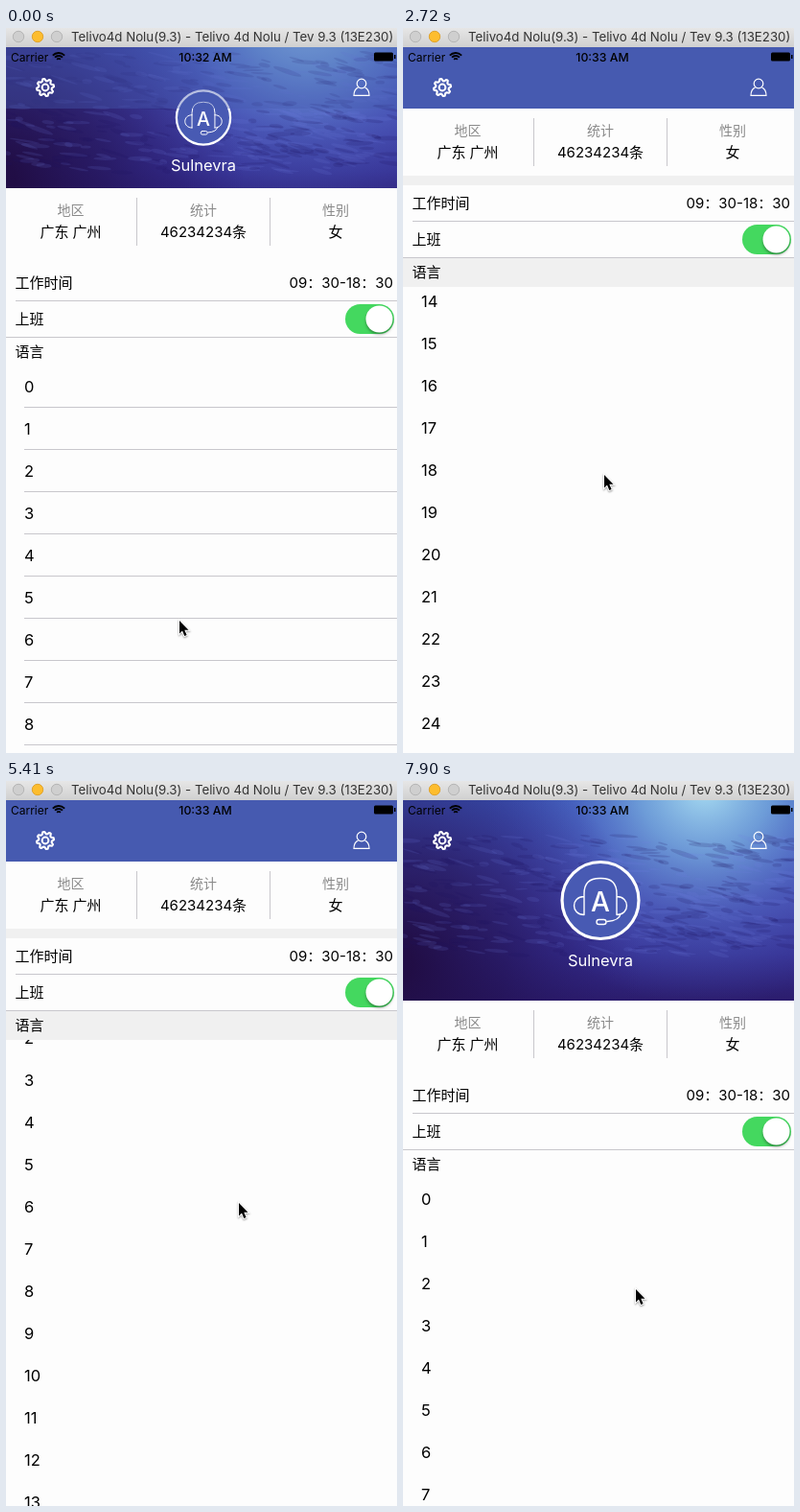
An HTML page with a canvas for the animation above (8 s loop, 408 by 756 pixels).

```html
<!DOCTYPE html>
<html lang="zh-CN">
<head>
<meta charset="utf-8">
<style>
  html, body { margin: 0; width: 100%; height: 100%; overflow: hidden; background: #fdfdfd; }
  canvas { display: block; width: 408px; height: 756px; }
</style>
</head>
<body>
<canvas id="stage" width="408" height="756"></canvas>
<script>
const W = 408, H = 756, LOOP = 8000, STEP = 117.7, NAV = 84;
const BLUE = '#465ab0', LINE = '#c8c7cc', INK = '#000', GRAY = '#8a8a8a';
const ctx = document.getElementById('stage').getContext('2d');

// [step, first row y, pointer x, pointer y]
const KEYS = [
  [0, 374, 181, 618], [4, 330, 186, 580], [7, 258, 189, 545], [11, 90, 193, 528],
  [17, -111, 197, 506], [24, -360, 212, 460], [31, -503, 225, 422], [34, -420, 230, 452],
  [39, -94, 238, 520], [45, 180, 243, 440], [50, 287, 246, 378], [53, 312, 246, 402],
  [56, 374, 245, 464], [59, 374, 245, 464], [62, 384, 244, 473], [67, 436, 243, 530]
];

function slope(i, c) {
  if (i === 0 || i === KEYS.length - 1) return 0;
  const [p, k, n] = [KEYS[i - 1], KEYS[i], KEYS[i + 1]];
  const a = (k[c] - p[c]) / (k[0] - p[0]), b = (n[c] - k[c]) / (n[0] - k[0]);
  return a * b > 0 ? 2 * a * b / (a + b) : 0;
}

function valueAt(step, c) {
  let i = 0;
  while (i < KEYS.length - 2 && step >= KEYS[i + 1][0]) i++;
  const a = KEYS[i], b = KEYS[i + 1], d = b[0] - a[0];
  const u = Math.min(1, (step - a[0]) / d), v = 1 - u;
  return Math.round(a[c] * (1 + 2 * u) * v * v + b[c] * u * u * (3 - 2 * u)
    + d * (slope(i, c) * u * v * v - slope(i + 1, c) * u * u * v));
}

function text(str, x, y, size, color = INK, align = 'left', weight = 400) {
  ctx.font = `${weight} ${size}px Inter, "Noto Sans CJK SC", "Noto Sans CJK", sans-serif`;
  ctx.textAlign = align;
  ctx.fillStyle = color;
  ctx.fillText(str, x, Math.round(y + size * 0.365));
}

function rect(x, y, w, h, color) {
  ctx.fillStyle = color;
  ctx.fillRect(x, y, w, h);
}

function disc(x, y, r, fill, stroke, width = 1) {
  ctx.beginPath();
  ctx.arc(x, y, r, 0, Math.PI * 2);
  if (fill) { ctx.fillStyle = fill; ctx.fill(); }
  if (stroke) { ctx.strokeStyle = stroke; ctx.lineWidth = width; ctx.stroke(); }
}

function pill(x, y, w, h, r, color) {
  ctx.beginPath();
  ctx.roundRect(x, y, w, h, r);
  ctx.fillStyle = color;
  ctx.fill();
}

function strokePath(d, width, color = '#fff') {
  ctx.strokeStyle = color;
  ctx.lineWidth = width;
  ctx.stroke(new Path2D(d));
}

// Underwater backdrop, centred vertically in the header.
const sea = document.createElement('canvas');
sea.width = W;
sea.height = 260;
(function paintSea() {
  const g = sea.getContext('2d');
  const fill = (gradient, stops) => {
    stops.forEach(([at, color]) => gradient.addColorStop(at, color));
    g.fillStyle = gradient;
    g.fillRect(0, 0, W, 260);
  };
  fill(g.createLinearGradient(0, 20, 0, 240), [
    [0, '#3a55b4'], [0.25, '#404cb0'], [0.5, '#403fa4'], [0.75, '#352f90'], [1, '#2a1a68']
  ]);
  fill(g.createRadialGradient(315, 10, 0, 315, 10, 230), [
    [0, 'rgba(170,222,242,1)'], [0.3, 'rgba(125,180,228,.75)'],
    [0.6, 'rgba(90,125,212,.4)'], [1, 'rgba(75,90,200,0)']
  ]);
  fill(g.createRadialGradient(-10, 195, 20, -10, 195, 260), [
    [0, 'rgba(32,12,66,.95)'], [0.4, 'rgba(34,16,80,.65)'], [1, 'rgba(40,24,110,0)']
  ]);
  let seed = 7;
  const rnd = () => (seed = seed * 16807 % 2147483647) / 2147483647;
  for (let i = 0; i < 420; i++) {
    const x = rnd() * W, depth = rnd(), y = 62 + depth * 125;
    g.fillStyle = rnd() > 0.5 ? 'rgba(115,130,230,.14)' : 'rgba(32,18,95,.17)';
    g.beginPath();
    g.ellipse(x, y, 4 + rnd() * 12, 0.8 + rnd() * 1.8, 0.35 - rnd() * 0.4, 0, Math.PI * 2);
    g.fill();
  }
})();

function drawAvatar(cy, d) {
  ctx.save();
  ctx.translate(206, cy);
  ctx.scale(d / 83, d / 83);
  disc(0, 0, 40, '#485ab3', '#fff', 3.2);
  ctx.lineCap = 'round';
  strokePath('M-17 15V-7Q-17-23-1-23H1Q17-23 17-7V15'
    + 'M-17-4C-31-4-31 15-17 15M17-4C31-4 31 15 17 15'
    + 'M21 14Q20 21 7 22', 1.4);
  ctx.beginPath();
  ctx.roundRect(-4, 20, 10, 5, 2.5);
  ctx.stroke();
  text('A', 0, 2, 28, '#fff', 'center', 500);
  ctx.restore();
}

function drawGear() {
  ctx.save();
  ctx.translate(41, 62);
  ctx.beginPath();
  for (let i = 0; i < 32; i++) {
    const a = (i - 1.5) / 32 * Math.PI * 2, r = i % 4 < 2 ? 6.9 : 9.1;
    ctx.lineTo(r * Math.sin(a), r * Math.cos(a));
  }
  ctx.closePath();
  ctx.lineJoin = 'round';
  ctx.lineWidth = 2.1;
  ctx.strokeStyle = '#fff';
  ctx.stroke();
  disc(0, 0, 3.4, null, '#fff', 2);
  ctx.restore();
}

function drawHeader(bottom) {
  const h = bottom - 20, cy = 20 + h / 2, d = h * 0.397;
  ctx.save();
  ctx.beginPath();
  ctx.rect(0, 20, W, h);
  ctx.clip();
  ctx.drawImage(sea, 0, Math.round(cy - 130));
  drawAvatar(cy, d);
  text('Sulnevra', 206, cy + d / 2 + 20.5, 16.5, '#fff', 'center');
  ctx.globalAlpha = Math.max(0, Math.min(1, (220 - bottom) / (220 - NAV)));
  rect(0, 20, W, NAV - 20, BLUE);
  ctx.restore();
  drawGear();
  disc(371, 58, 4.8, null, '#fff', 1.2);
  strokePath('M367.5 62Q363 64 363 70.4H379Q379 64 374.5 62', 1.2);
}

function drawStatus(clock) {
  text('Carrier', 5, 30.5, 12);
  for (const r of [2.5, 5.5, 8.5]) {
    ctx.beginPath();
    ctx.arc(55, 34.5, r, -Math.PI * 0.76, -Math.PI * 0.24);
    ctx.strokeStyle = INK;
    ctx.lineWidth = 1.8;
    ctx.stroke();
  }
  text(clock, 208, 30.5, 12.3, INK, 'center', 500);
  pill(384, 25.5, 20, 9, 1.5, INK);
  rect(405, 28, 1.5, 4, INK);
}

function drawWindowBar() {
  const g = ctx.createLinearGradient(0, 0, 0, 20);
  g.addColorStop(0, '#e6e6e6');
  g.addColorStop(1, '#d0d0d0');
  rect(0, 0, W, 20, g);
  disc(13, 9, 5.7, '#cfcfcf', '#b5b5b5');
  disc(33, 9, 5.7, '#fdbd2e', '#e0a32c');
  disc(53, 9, 5.7, '#cfcfcf', '#b5b5b5');
  text('Telivo4d Nolu(9.3) - Telivo 4d Nolu / Tev 9.3 (13E230)', 68, 9.5, 13.25, '#333');
}

function drawToggle(y) {
  pill(354, y - 15.5, 51, 31, 15.5, '#44d85f');
  ctx.save();
  ctx.shadowColor = 'rgba(0,0,0,.35)';
  ctx.shadowBlur = 3;
  ctx.shadowOffsetY = 2;
  disc(389.5, y, 14, '#fff');
  ctx.restore();
}

function drawInfo(top) {
  const columns = [['地区', '广东 广州', 67.5], ['统计', '46234234条', 206], ['性别', '女', 344]];
  for (const [label, value, x] of columns) {
    text(label, x, top + 23, 14, GRAY, 'center');
    text(value, x, top + 46, 15, INK, 'center');
  }
  rect(136, top + 10, 1, 50, LINE);
  rect(275, top + 10, 1, 50, LINE);
  if (top < 145) {
    rect(0, top + 70, W, 10, '#f0f0f0');
    rect(0, top + 156, W, 30, '#f0f0f0');
  }
  text('工作时间', 9.5, top + 98.5, 15);
  text('09：30-18：30', 404, top + 98.5, 15, INK, 'right');
  rect(10, top + 117, W - 10, 1, LINE);
  text('上班', 9.5, top + 136.5, 15);
  drawToggle(top + 136.5);
  rect(0, top + 155, W, 1, LINE);
  text('语言', 9.5, top + 171, 15);
}

function drawList(clipTop, first, ruled) {
  ctx.save();
  ctx.beginPath();
  ctx.rect(0, clipTop, W, H - clipTop);
  ctx.clip();
  for (let i = Math.max(0, Math.floor((clipTop - first) / 44)); first + i * 44 < H + 20; i++) {
    const y = first + i * 44;
    text(String(i), 19, y, 16.5);
    if (ruled) rect(19, y + 21, W - 19, 1, LINE);
  }
  ctx.restore();
}

function drawPointer(x, y) {
  ctx.save();
  ctx.translate(x, y);
  ctx.shadowColor = 'rgba(0,0,0,.4)';
  ctx.shadowBlur = 2;
  ctx.shadowOffsetY = 1;
  const arrow = 'M0 0V13.5L3 10.6L5.3 16L7.6 15L5.3 9.8H9.5Z';
  strokePath(arrow, 2);
  ctx.shadowColor = 'transparent';
  ctx.fillStyle = INK;
  ctx.fill(new Path2D(arrow));
  ctx.restore();
}

function draw(now) {
  const step = Math.min(67, Math.floor(now % LOOP / STEP));
  const first = valueAt(step, 1), bottom = Math.max(NAV, first - 207);
  rect(0, 0, W, H, '#fdfdfd');
  drawList(bottom + 186, first, step === 0);
  drawInfo(bottom);
  drawHeader(bottom);
  drawStatus(step < 4 ? '10:32 AM' : '10:33 AM');
  drawWindowBar();
  drawPointer(valueAt(step, 2), valueAt(step, 3));
}

const start = performance.now();
function tick() {
  draw(performance.now() - start);
  requestAnimationFrame(tick);
}
tick();
</script>
</body>
</html>
```
